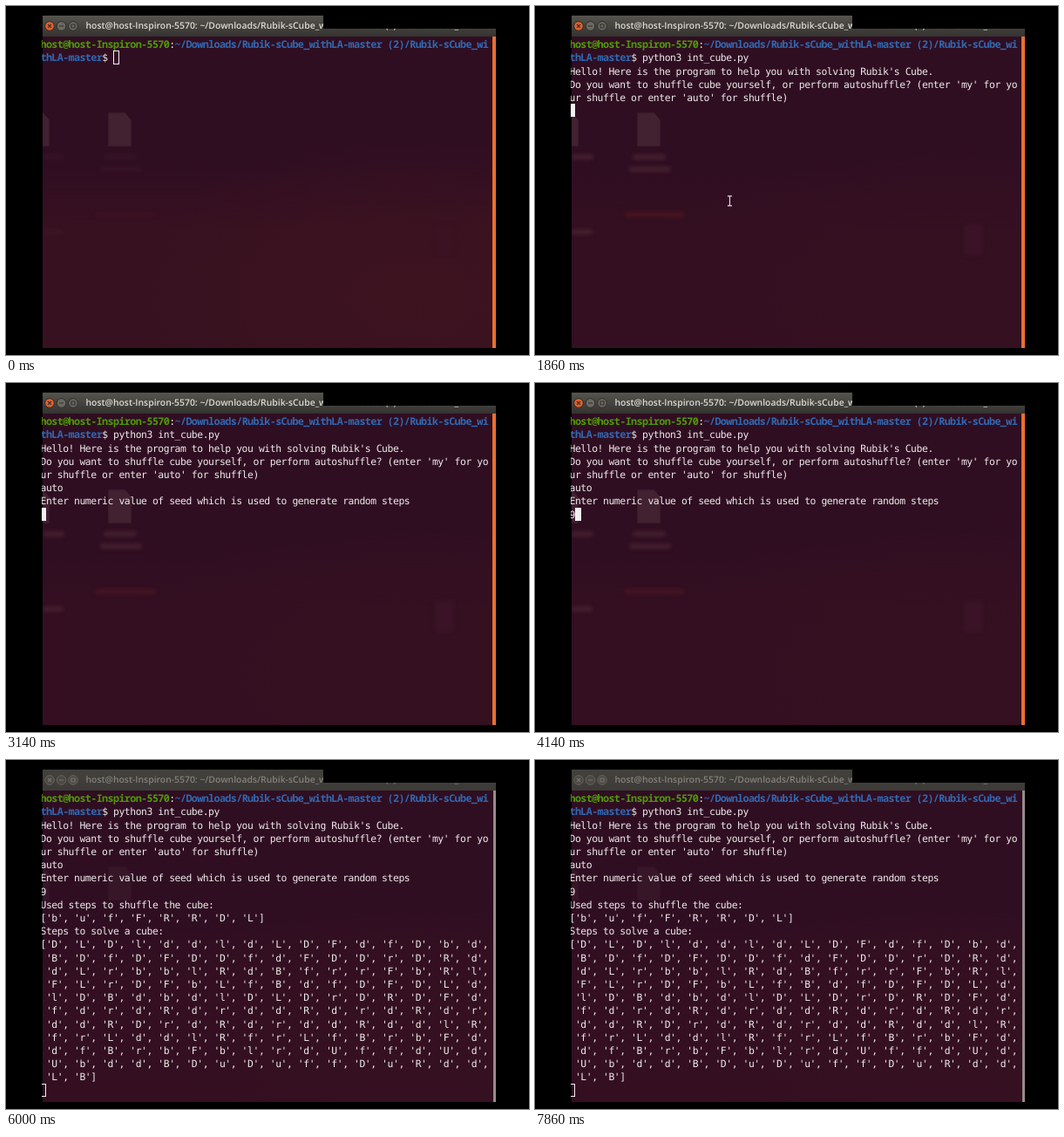
Recreate the animation shown at these times as an HTML page. Size 600 by 400 pixels, loop 8 s.

```html
<!DOCTYPE html>
<html lang="en">
<head>
<meta charset="utf-8">
<title>Terminal session</title>
<style>
  html, body { margin: 0; width: 100%; height: 100%; overflow: hidden; background: #000; }
  #stage { position: relative; width: 600px; height: 400px; overflow: hidden; background: #000; }
  #stage div, #stage svg, pre { position: absolute; }

  .bar { left: 42px; top: 11px; width: 520px; height: 24px; overflow: hidden;
    background: linear-gradient(#56544e, #3c3b37 75%, #35332f); }
  .notch { right: 0; top: 0; width: 198px; height: 15px; background: #000; }
  .title { left: 49.5px; top: 3px; width: 464px; overflow: hidden; white-space: pre;
    font: 600 10.4px/18px "Open Sans", "Noto Sans", sans-serif; color: #dfdbd2;
    text-rendering: geometricPrecision;
    -webkit-mask: linear-gradient(90deg, #000 92%, transparent);
    mask: linear-gradient(90deg, #000 92%, transparent); }
  .buttons { left: 0; top: 0; }
  .buttons circle { fill: #6b6962; stroke: #2e2d29; }
  .buttons .close { fill: #e5602f; }
  .buttons path { fill: none; stroke: #33312c; stroke-width: 1.2; }

  .body { left: 42px; top: 35px; width: 520px; height: 357px; overflow: hidden; background: #300e22; }
  .warm { inset: 0; background:
    radial-gradient(ellipse 330px 190px at 430px 300px, #40151f, transparent),
    linear-gradient(transparent 42%, #3a1220 62%); }
  .icon { width: 27px; height: 39px; top: 87px; background: #4a2a38; filter: blur(1px);
    clip-path: polygon(0 0, 72% 0, 100% 24%, 100% 100%, 0 100%); }
  .tag { height: 6px; border-radius: 3px; background: #4a2532; filter: blur(2px); }
  .scroll { right: 0; top: 0; width: 4px; height: 357px; background: #e9702f; }

  .screen { left: 41px; top: 35px; width: 517px; height: 357px; overflow: hidden; }
  pre { left: -1.5px; top: 2.2px; margin: 0; color: #eeeaec;
    font: 11.4px/15.2px "DejaVu Sans Mono", "Noto Sans Mono", monospace;
    letter-spacing: calc(6.42px - 1ch); text-rendering: geometricPrecision;
    font-variant-ligatures: none; }
  pre b { font-family: "Noto Sans Mono", "DejaVu Sans Mono", monospace; font-size: 11.8px;
    font-weight: 600; line-height: 1; letter-spacing: calc(6.42px - 1ch); }
  .who { color: #4e9a06; }
  .dir { color: #3069b2; }
  #cursor { width: 6.6px; height: 15.2px; box-sizing: border-box;
    border: 1px solid #f4f0f2; background: #f4f0f2; }
  #mouse { left: 0; top: 0; overflow: visible; }

  .idle .bar { background: linear-gradient(#42413c, #3c3b37); }
  .idle .title { color: #85827a; }
  .idle .buttons circle { fill: #4b4943; stroke: #66635b; }
  .idle .buttons path { stroke: #77746b; }
  .idle .scroll { width: 3px; background: #968c8b; }
  .hollow #cursor { background: none; }
</style>
</head>
<body>
<div id="stage">
  <div class="bar">
    <div class="title">host@host-Inspiron-5570: ~/Downloads/Rubik-sCube_withLA-master (2)/Rubik-sCube_withLA-master</div>
    <div class="notch"></div>
    <svg class="buttons" width="46" height="24">
      <circle class="close" cx="8" cy="12" r="5.3"/>
      <circle cx="21.5" cy="12" r="5.3"/>
      <circle cx="35" cy="12" r="5.3"/>
      <path d="M6 10l4 4m0-4l-4 4M19 12h5M33 10h4v4h-4z"/>
    </svg>
  </div>
  <div class="body">
    <div class="warm" id="warm"></div>
    <div id="icons">
      <div class="icon" style="left:75px"></div>
      <div class="icon" style="left:-19px"></div>
    </div>
    <div id="tags">
      <div class="tag" style="left:70px;top:135px;width:38px"></div>
      <div class="tag" style="left:66px;top:149px;width:48px"></div>
      <div class="tag" style="left:60px;top:201px;width:70px;background:#4c1620"></div>
      <div class="tag" style="left:0;top:135px;width:25px"></div>
      <div class="tag" style="left:0;top:221px;width:24px"></div>
      <div class="tag" style="left:450px;top:215px;width:22px;height:36px;background:#3c1628"></div>
    </div>
    <div class="scroll"></div>
  </div>
  <div class="screen">
    <pre><b class="who">host@host-Inspiron-5570</b>:<b class="dir">~/Downloads/Rubik-sCube_withLA-master (2)/Rubik-sCube_wi
thLA-master</b>$ <span id="out"></span></pre>
    <div id="cursor"></div>
  </div>
  <svg id="mouse" width="1" height="1">
    <path d="M-2.5-5.5h2l.5.5.5-.5h2M0-5V5M-2.5 5.5h2L0 5l.5.5h2" fill="none" stroke="#e6e0e4" stroke-width="1.1"/>
  </svg>
</div>
<script>
const LOOP = 8000, RATE = 7, COLS = 80, CELL = 6.42, ROW = 15.2, PROMPT = 13;
const $ = id => document.getElementById(id);
const stage = $('stage'), out = $('out'), cursor = $('cursor'), mouse = $('mouse');

const list = s => '[' + [...s].map(c => `'${c}'`).join(', ') + ']';
const wrap = s => s.match(new RegExp(`.{1,${COLS}}`, 'g')).join('\n');
const clamp = x => Math.max(0, Math.min(1, x));

const command = 'python3 int_cube.py';
const hello = "\nHello! Here is the program to help you with solving Rubik's Cube.\n" +
  wrap("Do you want to shuffle cube yourself, or perform autoshuffle? " +
    "(enter 'my' for your shuffle or enter 'auto' for shuffle)") + '\n';
const ask = '\nEnter numeric value of seed which is used to generate random steps\n';
const solution = 'DLDlddldLDFdfDbd' + 'BDfDFDDfdFDDrDRd' + 'dLrbblRdBfrrFbRl' +
  'FLrDFbLfBdfDFDLd' + 'lDBdbdlDLDrDRDFd' + 'fdrdRdrddRdrdRdr' + 'ddRDrdRdrddRddlR' +
  'frLddlRfrLfBrbFd' + 'dfBrbFblrdUffdUd' + 'UbddBDuDuffDuRdd' + 'LB';
const result = 'Used steps to shuffle the cube:\n' + list('bufFRRDL') +
  '\nSteps to solve a cube:\n' + wrap(list(solution)) + '\n';

function screenText(n) {
  let s = command.slice(0, Math.round(clamp((n - 1) / 7) * command.length));
  if (n >= 12) s += hello;
  else if (n >= 11) s += '\n';
  s += 'auto'.slice(0, Math.max(0, n - 16));
  if (n >= 22) s += ask;
  if (n >= 28) s += '9';
  if (n >= 30) s += '\n';
  if (n >= 31) s += result;
  return s;
}

function mouseAt(n) {
  if (n >= 8 && n < 17) {
    const k = clamp((n - 9) / 7), e = k * k * (3 - 2 * k);
    return [221 + 4 * e, 133 + 149 * e];
  }
  return n >= 33 && n < 37 ? [248, 303] : null;
}

let last = -1;
function draw(t) {
  const n = Math.floor((t + 5) * RATE / 1000) % (LOOP * RATE / 1000);
  if (n === last) return;
  last = n;

  const text = screenText(n), lines = text.split('\n');
  const row = lines.length, col = lines[row - 1].length + (row === 1 ? PROMPT : 0);
  out.textContent = text;
  cursor.style.left = col * CELL - 1.5 + 'px';
  cursor.style.top = row * ROW + 1.2 + 'px';

  const idle = n >= 32;
  stage.classList.toggle('idle', idle);
  stage.classList.toggle('hollow', idle || n < 2);
  $('warm').style.opacity = n < 12 ? 0.8 : 0.35;
  $('icons').style.opacity = idle ? 0.3 : 0.7;
  $('tags').style.opacity = idle ? 0 : n < 12 ? 0.25 : 0.8;

  const p = mouseAt(n);
  mouse.style.display = p ? '' : 'none';
  if (p) mouse.style.transform = `translate(${p[0]}px, ${p[1]}px)`;
}

const start = performance.now();
function tick() {
  draw((performance.now() - start) % LOOP);
  requestAnimationFrame(tick);
}
tick();
</script>
</body>
</html>
```
